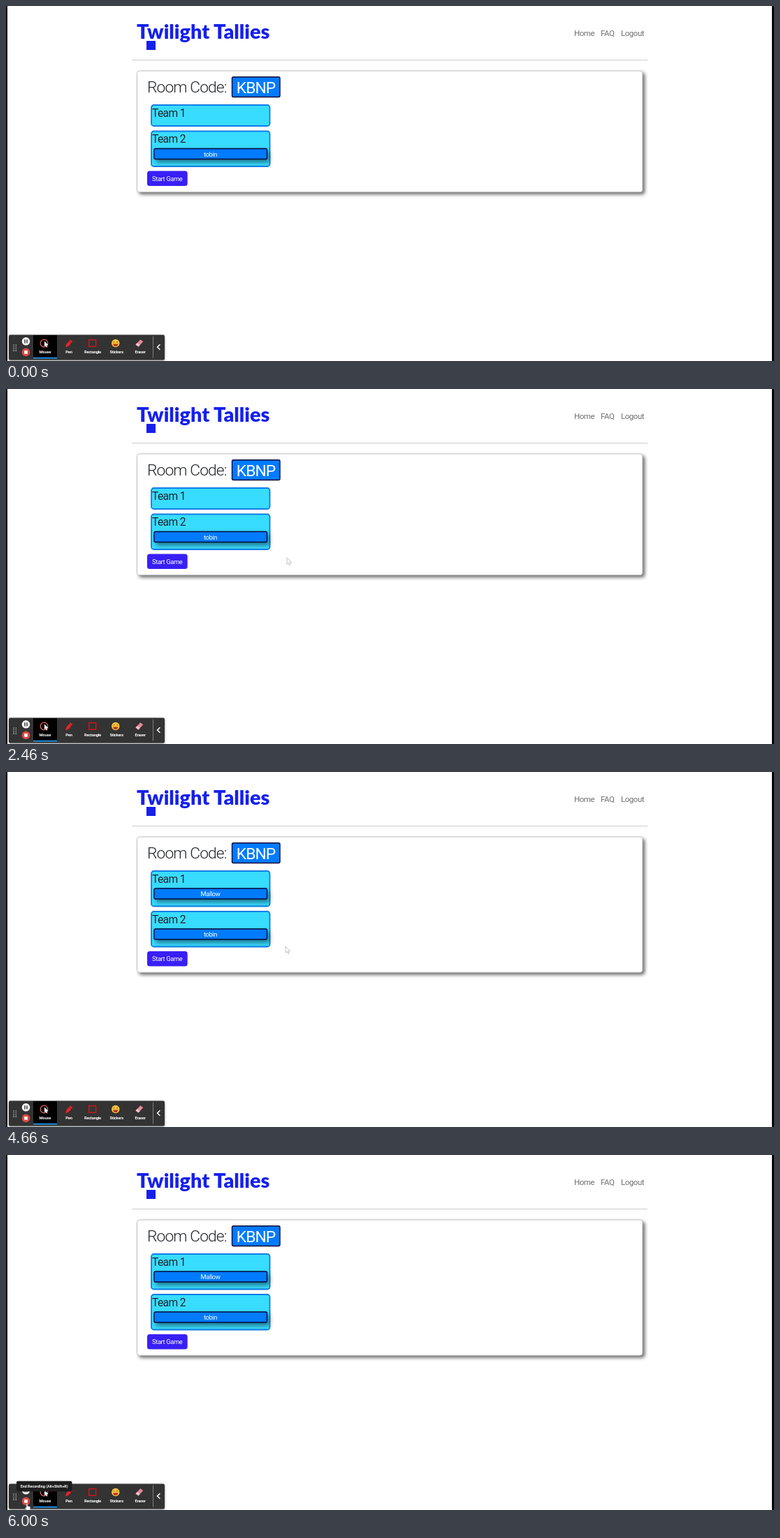
Animation, 1099 px wide and 509 px high, one loop 6.06 s. Source, as an HTML page:

```html
<!DOCTYPE html>
<html lang="en">
<head>
<meta charset="utf-8">
<title>Game lobby</title>
<style>
  html, body { margin: 0; width: 100%; height: 100%; overflow: hidden; background: #fff; }
  svg { display: block; width: 1099px; height: 509px; }
  text { font-family: Roboto, "Liberation Sans", sans-serif; letter-spacing: -.04em; }
  .brand { font: 900 28.8px Lato, sans-serif; letter-spacing: 0; fill: #1520ee; }
  .nav { font-size: 11.5px; fill: #707070; }
  .big { font-size: 22.8px; font-weight: 300; fill: #212529; }
  .code { font-weight: 400; fill: #fff; }
  .head { font-size: 15.6px; fill: #212529; }
  .small { font-size: 9.35px; fill: #fff; }
  .mid { text-anchor: middle; }
  .panel { fill: #fff; stroke: #c4c4c4; filter: drop-shadow(3px 3px 2.8px rgba(0,0,0,.58)); }
  .team { fill: #38dcff; stroke: #0f7de6; stroke-width: 1.8; }
  .chip { fill: #007bff; stroke: #020a38; stroke-width: 1.4; }
  .player .chip { filter: drop-shadow(3px 4px 3px rgba(0,0,0,.45)); }
  .bar { fill: #333; filter: drop-shadow(0 1px 1.5px rgba(0,0,0,.5)); }
  .tool, .tip text { font-weight: 700; font-size: 5.8px; letter-spacing: 0; fill: #fff; text-anchor: middle; }
  .tip text { font-size: 5.4px; }
</style>
</head>
<body>
<svg viewBox="0 0 1099 509">
  <defs>
    <path id="arrow" d="M0 0V9.2L2.2 7.3L3.7 10.7L5.2 10L3.7 6.8H6.6Z"/>
    <g id="player" class="player"><rect class="chip" x="212" y="26" width="161.5" height="15" rx="2"/></g>
  </defs>
  <rect width="1099" height="509" fill="#fff"/>
  <path d="M0 0H2V509H0ZM1096 0H1099V509H1096Z"/>

  <rect x="201" y="50" width="13" height="13" fill="#1520ee"/>
  <text class="brand" x="187" y="47">Twilight Tallies</text>
  <g class="nav">
    <text x="813" y="43">Home</text>
    <text x="851" y="43">FAQ</text>
    <text x="880" y="43">Logout</text>
  </g>
  <path d="M180 77.5H918" stroke="#ccc"/>

  <rect id="panel" class="panel" x="187.5" y="93" width="723.3" height="173.7" rx="3.5"/>
  <text class="big" x="202" y="124">Room Code:</text>
  <rect class="chip" x="323.5" y="101.7" width="68.5" height="28.8" rx="2"/>
  <text class="big code mid" x="357.5" y="125.3">KBNP</text>

  <g transform="translate(0 141)">
    <rect id="team1" class="team" x="208" y="1" width="169.5" height="30" rx="3.5"/>
    <text class="head" x="209" y="17.7">Team 1</text>
    <g id="joined">
      <use href="#player"/>
      <text class="small mid" x="292.5" y="37">Mallow</text>
    </g>
  </g>
  <g id="lower">
    <g transform="translate(0 178.5)">
      <rect class="team" x="208" y="1" width="169.5" height="50.5" rx="3.5"/>
      <text class="head" x="209" y="17.5">Team 2</text>
      <use href="#player"/>
      <text class="small mid" x="292.5" y="37">tobin</text>
    </g>
    <rect x="202" y="236.5" width="57.7" height="21.5" rx="3.5" fill="#391ff5"/>
    <text class="small mid" x="230.7" y="250.7">Start Game</text>
  </g>

  <g id="toolbar">
    <rect class="bar" x="4" y="471.5" width="223" height="36" rx="2"/>
    <path d="M11 485.5V495M14.3 485.5V495" stroke="#ccc" stroke-width="1.3" stroke-dasharray="1.3 1.4"/>
    <circle cx="28.5" cy="480.8" r="5.8" fill="#f4f4f4"/>
    <path d="M27 478.2V483.4M30 478.2V483.4" stroke="#333" stroke-width="1.4"/>
    <circle cx="28.5" cy="496.4" r="5.8" fill="#d64a45"/>
    <rect x="26.2" y="494.1" width="4.6" height="4.6" rx=".5" fill="#fff"/>

    <rect x="39" y="472" width="34" height="33" fill="#000"/>
    <rect x="39" y="503.8" width="34" height="1.7" fill="#1b98f5"/>
    <circle cx="54.5" cy="483.5" r="5.3" fill="none" stroke="#e0605c" stroke-width="1.3"/>
    <use href="#arrow" transform="translate(55 480.5) scale(.85)" fill="#fff"/>

    <path d="M85 489.5L86.3 485L92 478.2L95.3 481L89.5 487.8Z" fill="#e3262c"/>
    <path d="M90.4 480.2L93.6 482.9" stroke="#8f1519"/>
    <rect x="118.8" y="478.6" width="9.8" height="9.6" fill="none" stroke="#c5161d" stroke-width="1.6"/>
    <circle cx="156.8" cy="483.5" r="5.7" fill="#f8c441"/>
    <path d="M153.2 484.5H160.4Q159.8 488 156.8 488T153.2 484.5Z" fill="#b5322a"/>
    <path d="M153.5 482.2Q154.5 480.4 155.5 482.2M158.1 482.2Q159.1 480.4 160.1 482.2" fill="none" stroke="#5c3a12" stroke-width=".9"/>
    <path d="M185.5 485.4L192.3 478.2L196.3 481.3L189.4 488.6Z" fill="#e58a96"/>
    <path d="M185.5 485.4L187.8 483L191.8 486.1L189.4 488.6Z" fill="#f5c3c8"/>
    <g class="tool">
      <text x="55.8" y="498.3">Mouse</text>
      <text x="90" y="498.3">Pen</text>
      <text x="124" y="498.3">Rectangle</text>
      <text x="158.2" y="498.3">Stickers</text>
      <text x="192" y="498.3">Eraser</text>
    </g>
    <path d="M210.5 473.5V504.5" stroke="#888" stroke-width=".9"/>
    <path d="M220.4 485.2L216.6 489L220.4 492.8" fill="none" stroke="#fff" stroke-width="1.5"/>
  </g>

  <g id="mouseTip" class="tip">
    <rect x="34.5" y="448" width="46" height="15.5" rx="2" fill="#4c4c4e"/>
    <text x="57.4" y="457.7">Mouse Pointer</text>
  </g>
  <g id="endTip" class="tip">
    <rect x="15" y="467.5" width="79.5" height="15" rx="2" fill="#1e1e1f"/>
    <text x="54.7" y="477">End Recording (Alt+Shift+R)</text>
  </g>

  <g id="cursor" stroke="#a8a8a8" stroke-width=".7" fill="#fff">
    <use id="pointer" href="#arrow"/>
    <path id="hand" d="M1.2 1Q2 0 2.8 1V4L6 4.8Q7 5.2 6.7 6.5L6 10H2.2L-.5 6.6Q-.3 5.4 1.2 6.4Z"/>
  </g>
</svg>
<script>
  const LOOP = 6060, JOIN = 3660, GROW = 20.5;
  // Cursor tip: time, x, y
  const path = [
    [1730, 842, 255], [2290, 402, 242], [3930, 402, 242], [4500, 400, 250],
    [4680, 400, 250], [5230, 50, 483], [5460, 25.5, 503],
    [5640, 25.5, 503], [5800, 28, 499.5]
  ];
  const el = id => document.getElementById(id);
  const show = (id, on) => el(id).setAttribute("visibility", on ? "visible" : "hidden");

  function cursorAt(t) {
    const i = path.findIndex(p => p[0] > t);
    if (i === 0) return path[0].slice(1);
    if (i < 0) return path[path.length - 1].slice(1);
    const [a, b] = [path[i - 1], path[i]];
    const u = (t - a[0]) / (b[0] - a[0]), k = u * u * (3 - 2 * u);
    return [1, 2].map(n => a[n] + (b[n] - a[n]) * k);
  }

  function draw(t) {
    const joined = t >= JOIN, grow = joined ? GROW : 0;
    show("joined", joined);
    el("team1").setAttribute("height", 30 + grow);
    el("panel").setAttribute("height", 173.7 + grow);
    el("lower").setAttribute("transform", `translate(0 ${grow})`);

    const seen = t >= 1660, press = t >= 5790;
    show("pointer", seen && !press);
    show("hand", press);
    el("cursor").setAttribute("transform", `translate(${cursorAt(t)})`);
    show("mouseTip", t >= 5330 && t < 5700);
    show("endTip", press);
  }

  const start = performance.now();
  function tick() {
    draw((performance.now() - start) % LOOP);
    requestAnimationFrame(tick);
  }
  tick();
</script>
</body>
</html>
```
